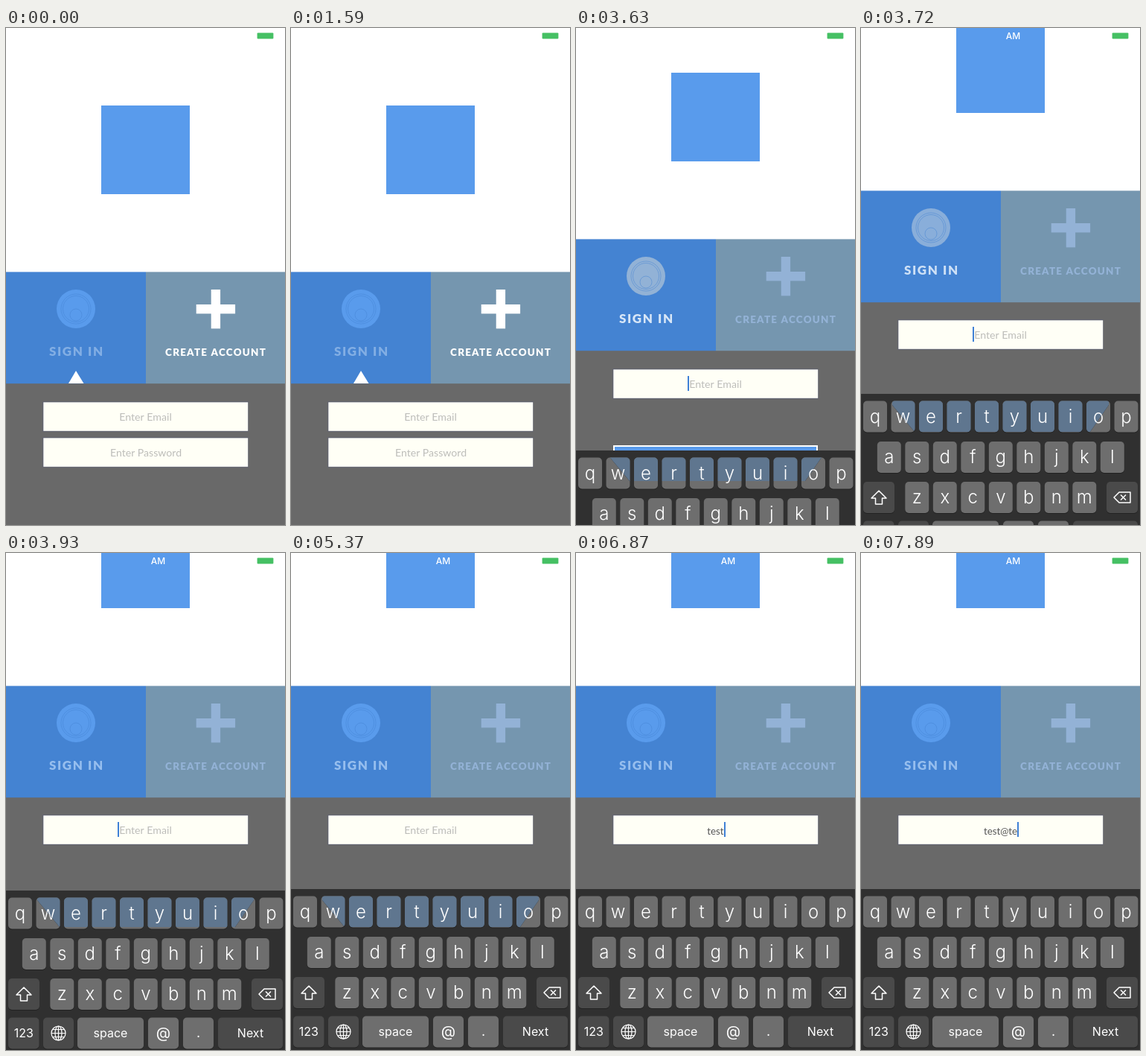
Recreate the animation shown at these times as an HTML page with a canvas. Size 375 by 667 pixels, loop 8000 ms.

```html
<!DOCTYPE html>
<html lang="en">
<head>
<meta charset="utf-8">
<title>Sign-in screen</title>
<style>
  html, body { margin: 0; width: 100%; height: 100%; overflow: hidden; background: #fff; }
  canvas { display: block; width: 375px; height: 667px; }
</style>
</head>
<body>
<canvas id="stage"></canvas>
<script>
const W = 375, H = 667, LOOP = 8000;
const canvas = document.getElementById('stage');
const dpr = window.devicePixelRatio || 1;
canvas.width = W * dpr;
canvas.height = H * dpr;
const c = canvas.getContext('2d');

const BLUE = [89, 155, 236], PANEL = '#4483d2', SLATE = '#7596af', GREY = '#696969';
const CREAM = '#fffff6', KEY = '#6e6e6e', DARK_KEY = '#4a4a4a';
const LABEL = 'Lato, "Open Sans", sans-serif';
const SYSTEM = 'Inter, Roboto, sans-serif';

// [time of key press, character]
const TYPED = [[5620, 't'], [5860, 'e'], [6090, 's'], [6340, 't'], [6960, '@'], [7530, 't'], [7800, 'e']];

const clamp = v => Math.max(0, Math.min(1, v));
const ramp = (t, from, to) => clamp((t - from) / (to - from));
const smooth = u => u * u * (3 - 2 * u);
const ease = (t, from, to) => smooth(ramp(t, from, to));
const rgb = a => `rgb(${a.map(Math.round).join()})`;
const mix = (a, b, k) => a.map((v, i) => v + (b[i] - v) * k);

// Critically damped spring from 0 to 1
function spring(t, start, rate) {
  const x = Math.max(0, t - start) / 1000 * rate;
  return 1 - (1 + x) * Math.exp(-x);
}

function rect(x, y, w, h, fill) {
  c.fillStyle = fill;
  c.fillRect(x, y, w, h);
}

function roundRect(x, y, w, h, r, fill) {
  c.beginPath();
  c.roundRect(x, y, w, h, r);
  c.fillStyle = fill;
  c.fill();
}

function poly(points, fill) {
  c.beginPath();
  points.forEach(([x, y]) => c.lineTo(x, y));
  c.closePath();
  if (fill) {
    c.fillStyle = fill;
    c.fill();
  }
}

function circle(x, y, r) {
  c.beginPath();
  c.arc(x, y, r, 0, Math.PI * 2);
}

function text(str, x, y, font, fill, spacing = 0) {
  c.font = font;
  c.letterSpacing = spacing + 'px';
  c.textAlign = 'center';
  c.fillStyle = fill;
  c.fillText(str, x + spacing / 2, y);
  c.letterSpacing = '0px';
}

function faded(alpha, draw) {
  if (alpha <= 0) return;
  c.save();
  c.globalAlpha *= alpha;
  draw();
  c.restore();
}

function shifted(dy, draw) {
  c.save();
  c.translate(0, dy);
  draw();
  c.restore();
}

function field(y) {
  rect(49.5, y - 0.5, 276, 40, '#5d6079');
  rect(50.3, y + 0.3, 274.9, 38.5, CREAM);
}

function caretAlpha(t) {
  if (t < 3420) return 0;
  if (t > 5560) return 1;
  return 1 - ease(t, 4260, 4440) + ease(t, 4770, 4950) - ease(t, 5110, 5320);
}

function drawHeader(t, swap) {
  // brand mark stand-in
  rect(128, 104, 119, 119, rgb(BLUE));
  rect(0, 327.4, 188, 149.8, PANEL);
  rect(188, 327.4, 187, 149.8, SLATE);

  const glow = swap * (1 - ease(t, 3660, 3900));
  c.fillStyle = rgb(mix(BLUE, [146, 178, 214], glow));
  circle(94, 377, 26);
  c.fill();
  faded(0.6, () => {
    c.strokeStyle = PANEL;
    c.lineWidth = 0.8;
    for (const [y, r] of [[377, 20], [377, 17.5], [385, 8]]) {
      circle(94, y, r);
      c.stroke();
    }
  });
  const rest = mix([130, 174, 228], [150, 190, 238], swap);
  text('SIGN IN', 94, 440, `900 17px ${LABEL}`, rgb(mix(rest, [215, 230, 247], glow)), 1.6);

  const create = rgb(mix([255, 255, 255], [147, 178, 214], swap));
  rect(275.7, 351, 12.4, 52.4, create);
  rect(255.7, 371, 52.4, 12.4, create);
  text('CREATE ACCOUNT', 281.5, 440.2, `900 13.4px ${LABEL}`, create, 1.25);
}

function drawForm(t, swap) {
  field(502);
  const value = TYPED.filter(k => t >= k[0]).map(k => k[1]).join('');
  if (value) text(value, 187.5, 527.5, `400 13.3px ${LABEL}`, '#555');
  else text('Enter Email', 187.5, 526.5, `400 14.2px ${LABEL}`, '#bdbdba');
  c.font = `400 13.3px ${LABEL}`;
  const caretX = value ? 187.5 + c.measureText(value).width / 2 : 150;
  faded(caretAlpha(t), () => rect(Math.round(caretX), 511, 2, 20, '#3f80d6'));

  faded(1 - swap, () => {
    field(550);
    text('Enter Password', 188, 574.5, `400 14.1px ${LABEL}`, '#bdbdba');
  });
  faded(swap, () => {
    rect(50, 604, 275, 39, '#fff');
    rect(52, 606, 271, 35, rgb(BLUE));
    text('Create Account', 187.5, 629, `400 14px ${LABEL}`, '#fff');
  });
}

function key(x, y, w, fill, label, size = 24, dy = 29) {
  roundRect(x, y + 1, w, 42, 5, '#222');
  roundRect(x, y, w, 42, 5, fill);
  if (label) text(label, x + w / 2, y + dy, `${size > 20 ? 300 : 400} ${size}px ${SYSTEM}`, '#fff');
}

function letterRow(letters, x, y, fill = KEY) {
  [...letters].forEach((ch, i) => key(x + i * 37.5, y, 32, fill, ch));
}

function drawIcons() {
  c.strokeStyle = '#fff';
  c.lineWidth = 1.5;
  c.lineJoin = 'round';
  // shift
  poly([[24, 130], [34, 140], [28.5, 140], [28.5, 148], [19.5, 148], [19.5, 140], [14, 140]]);
  c.stroke();
  // delete
  poly([[340, 139], [347, 132], [362, 132], [362, 146], [347, 146]]);
  c.stroke();
  c.beginPath();
  c.moveTo(349, 135.5);
  c.lineTo(356, 142.5);
  c.moveTo(356, 135.5);
  c.lineTo(349, 142.5);
  c.stroke();
  // globe
  c.lineWidth = 1.2;
  circle(70.5, 191.5, 9.5);
  c.stroke();
  c.beginPath();
  c.ellipse(70.5, 191.5, 4.5, 9.5, 0, 0, Math.PI * 2);
  c.moveTo(70.5, 182);
  c.lineTo(70.5, 201);
  c.moveTo(61, 191.5);
  c.lineTo(80, 191.5);
  for (const y of [186.5, 196.5]) {
    c.moveTo(62.5, y);
    c.lineTo(78.5, y);
  }
  c.stroke();
}

function drawKeyboard(t, top, buttonY) {
  shifted(top, () => {
    rect(0, 0, W, 217, '#303030');
    letterRow('qwertyuiop', 3, 9.5);

    // the button glows through the top row of keys
    faded(1 - ramp(t, 5550, 5730), () => {
      const y = buttonY - top;
      poly([[42, y - 4], [333, y - 4], [333, y + 12], [308, y + 48], [72, y + 48], [42, y + 12]]);
      c.clip();
      letterRow('wertyuio', 40.5, 9.5, '#5f768f');
    });

    letterRow('asdfghjkl', 21.8, 64);
    key(3, 118, 42, DARK_KEY);
    letterRow('zxcvbnm', 59.3, 118);
    key(330, 118, 42, DARK_KEY);
    key(3, 170.5, 41.5, DARK_KEY, '123', 16, 26.5);
    key(50, 170.5, 41, DARK_KEY);
    key(96, 170.5, 89, KEY, 'space', 16, 26.5);
    key(191, 170.5, 41, KEY, '@', 20, 27.5);
    key(238, 170.5, 41, KEY, '.', 18, 26.5);
    key(285, 170.5, 87, DARK_KEY, 'Next', 16, 26.5);
    drawIcons();
  });
}

function draw(t) {
  c.setTransform(dpr, 0, 0, dpr, 0, 0);
  rect(0, 0, W, H, '#fff');

  const swap = ease(t, 1680, 2460);
  const lift = ease(t, 3523, 3823);
  const headerY = -Math.round(149 * lift);
  const formY = -Math.round(150 * lift);

  rect(0, 477 + headerY, W, H, GREY);
  shifted(headerY, () => {
    drawHeader(t, swap);
    faded(1 - swap, () => poly([[94, 460], [104.5, 477], [84, 477]], '#fff'));
  });
  shifted(formY, () => drawForm(t, swap));

  const rise = spring(t, 3539, 17);
  if (rise > 0) drawKeyboard(t, Math.round(H - 216 * rise), 604 + formY);

  // status bar
  text('AM', 204.5, 14.5, `500 12px ${SYSTEM}`, '#fff');
  roundRect(337.6, 6.6, 21.8, 7.8, 1, '#45c063');
}

const start = performance.now();
function tick() {
  draw((performance.now() - start) % LOOP);
  requestAnimationFrame(tick);
}
tick();
</script>
</body>
</html>
```
